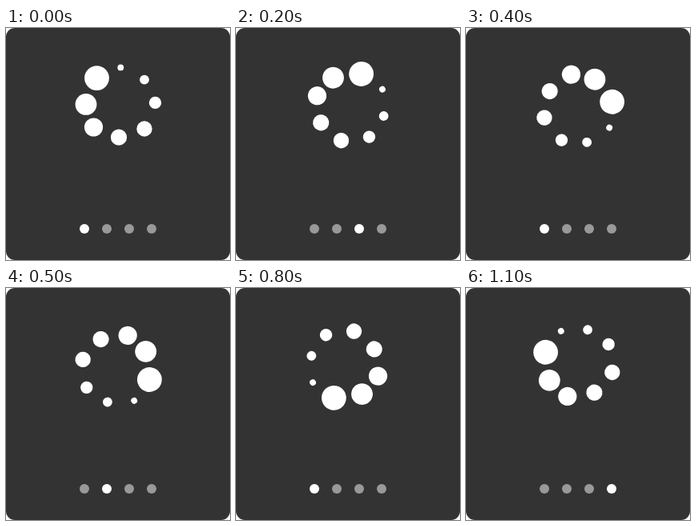
An HTML page that plays this animation: 280 px wide and 290 px high, repeating every 1.2 s.

```html
<!DOCTYPE html>
<html lang="en">
<head>
<meta charset="utf-8">
<title>Loading</title>
<style>
  html, body { margin: 0; width: 100%; height: 100%; overflow: hidden; background: #fff; }
  svg { display: block; }
</style>
</head>
<body>
<svg width="280" height="290" viewBox="0 0 280 290">
  <rect width="280" height="290" rx="11" fill="#333"/>
  <g id="spinner" fill="#fff"></g>
  <g id="pager"></g>
</svg>
<script>
  const STEP_MS = 100;
  const STEPS = 12;
  const CENTER = [139.5, 97.4];
  // Offset from the center and radius of each spinner ball
  const BALLS = [
    [-26, -34.8, 15.4], [-39.5, -2, 13.4], [-30, 26.6, 11.6], [1.5, 39.3, 10.1],
    [33.5, 28.6, 9.7], [47, -4, 7.7], [33.5, -32.8, 5.9], [3.8, -48, 3.9]
  ];

  const spinner = document.getElementById('spinner');
  const pager = document.getElementById('pager');

  function addCircle(parent, cx, cy, r) {
    const circle = document.createElementNS('http://www.w3.org/2000/svg', 'circle');
    for (const [name, value] of Object.entries({ cx, cy, r })) circle.setAttribute(name, value);
    parent.appendChild(circle);
    return circle;
  }

  BALLS.forEach(([x, y, r]) => addCircle(spinner, x, y, r));
  const dots = [0, 1, 2, 3].map(i => addCircle(pager, 98 + 28 * i, 251, 6));

  function render(time) {
    const step = Math.floor(time / STEP_MS) % STEPS;
    spinner.setAttribute('transform', `translate(${CENTER}) rotate(${step * 360 / STEPS})`);
    dots.forEach((dot, i) => dot.setAttribute('fill', i === step % dots.length ? '#fff' : '#999'));
  }

  const start = performance.now();
  function tick() {
    render(performance.now() - start);
    requestAnimationFrame(tick);
  }
  tick();
</script>
</body>
</html>
```
